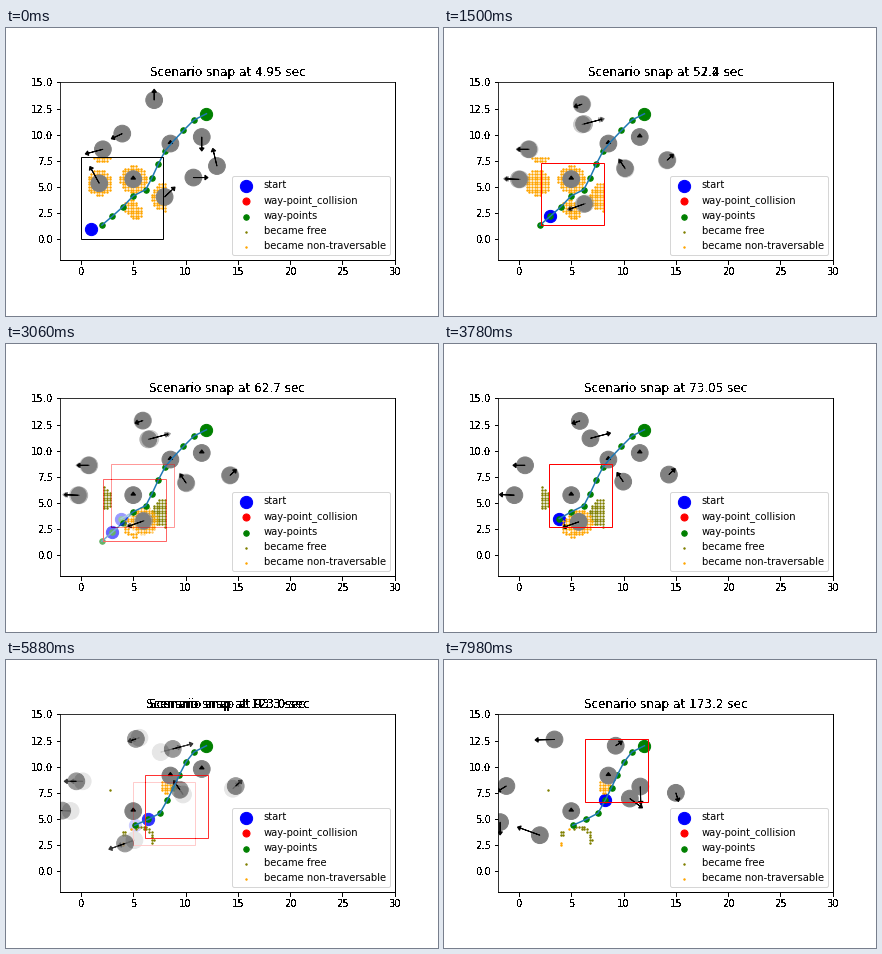
Write a matplotlib script that moves like this. It is 432 by 288 pixels and loops after 8 s.

```python
import numpy as np
import matplotlib.pyplot as plt
from matplotlib.animation import FuncAnimation
from matplotlib.patches import Circle, Rectangle

plt.rcParams.update({"font.family": "DejaVu Sans", "font.size": 10})

TICK, LOOP = 20, 8000
HOLD, FADE, STEPS = 300, 60, 5
PERIOD = HOLD + FADE * (STEPS - 1)
CELL = 0.25
ARROW_SECONDS = 42

TIMES = [4.95, 31.4, 52.2, 57.4, 62.65, 62.7, 67.85, 73.05,
         78.25, 83.2, 93.3, 123.0, 146.85, 170.15, 173.2, 173.2]
REPLAN, REROUTE = 5, 9  # snaps at which the known cells change

FIRST_ROUTE = [2 + 1.35j, 3 + 2.2j, 4 + 3.1j, 5 + 4.15j, 6.2 + 4.75j, 6.8 + 5.9j,
               7.4 + 7.2j, 8.05 + 8.45j, 8.8 + 9.35j, 9.8 + 10.4j, 10.8 + 11.4j, 12 + 12j]
NEW_ROUTE = [5.15 + 4.4j, 6.4 + 4.95j, 7.55 + 5.55j, 8.25 + 6.8j, 8.85 + 8j,
             9.4 + 9.2j, 10.05 + 10.45j, 10.8 + 11.4j, 12 + 12j]

# First snap, robot position, view direction in degrees, view reach
STAGES = [
    (0, 1 + 1j, 45, 4),
    (1, FIRST_ROUTE[0], 0, 3),
    (2, FIRST_ROUTE[1], 45, 3),
    (6, 3.85 + 3.5j, 47, 3),
    (9, NEW_ROUTE[0], 22, 3),
    (11, NEW_ROUTE[1], 24, 3),
    (12, NEW_ROUTE[2], 22, 3),
    (13, NEW_ROUTE[3], 69, 3),
]

# Each agent: initial arrow, then its turning points; steady speed in between
TURNS = [4.95, 31, 123.5, 173.2]
AGENTS = [
    (.75j, [7 + 13.3j, 6.3 + 13j, 5.25 + 12.65j, 3.4 + 12.6j]),
    (-.78 - .37j, [3.95 + 10.1j, 5.2 + 10.75j, 8.8 + 11.7j, 9.25 + 12j]),
    (-1.4 - .37j, [2.1 + 8.6j, 1.45 + 8.6j, -.45 + 8.6j, -1.2 + 8.15j]),
    (0, [8.55 + 9.15j] * 4),
    (-1.05j, [11.55 + 9.78j] * 3 + [11.6 + 8.1j]),
    (1.1, [10.75 + 5.9j, 10.4 + 6.4j, 9.45 + 7.8j, 10.6 + 6.95j]),
    (-.33 + 1.4j, [13 + 7j, 13.95 + 7.35j, 14.8 + 8.15j, 15 + 7.5j]),
    (.78 + .74j, [8 + 4.05j, 7 + 3.65j, 4.2 + 2.65j, 2 + 3.45j]),
    (-.75 + 1.35j, [1.75 + 5.35j, .7 + 5.7j, -1.8 + 5.8j, -1.8 + 4.7j]),
    (0, [5 + 5.75j] * 4),
]
CROSSING = AGENTS[7][1]

axis = np.arange(0, 16, CELL)
grid = axis + 1j * axis[:, None]


def disk(x, y, r):
    return abs(grid - (x + 1j * y)) <= r


def ring(x, y, inner, outer):
    return disk(x, y, outer) & ~disk(x, y, inner)


def xy(points):
    points = np.atleast_1d(np.asarray(points, complex))
    return points.real, points.imag


def place_at(turns, t):
    return np.interp(t, TURNS, turns)


def cells(n, t):
    """Return the freed and the blocked cells of a snap."""
    left = disk(1.75, 5.4, 1.25)
    right = disk(8, 4.05, 1.3) & (grid.real <= 8)
    if n < REPLAN:
        free = np.zeros(grid.shape, bool)
        blocked = (left | right | disk(5, 5.75, 1.3) | disk(4.8, 3.1, .7)
                   | disk(5.2, 2.6, .7) | (disk(2, 8.6, 1.25) & (grid.imag <= 7.8)))
    elif n < REROUTE:
        free = (left & (grid.real > 2)) | right
        crossing = place_at(CROSSING, t)
        blocked = (disk(crossing.real, crossing.imag, 1.3)
                   | (ring(5.2, 2.8, .75, 1.12) & (grid.real < 5.3) & (grid.imag < 3.6)))
    else:
        arc = ring(5.6, 3, 1.05, 1.42) & (grid.real > 5.2) & (grid.imag > 2.6)
        free = arc | disk(4.1, 3.6, .22) | disk(2.75, 7.75, .1)
        blocked = disk(8.2, 8.1, .65) | disk(4.75, 4, .1) | disk(4, 2.7, .21)
    return grid[free], grid[blocked]


def route_of(n, robot):
    if n < 6:
        return FIRST_ROUTE
    return [robot] + FIRST_ROUTE[3:] if n < REROUTE else NEW_ROUTE


def draw_agent(ax, first_arrow, turns, t):
    place = place_at(turns, t)
    leg = np.searchsorted(TURNS[1:-1], t)
    speed = (turns[leg + 1] - turns[leg]) / (TURNS[leg + 1] - TURNS[leg])
    arrow = complex(speed * ARROW_SECONDS if leg else first_arrow)
    ax.add_patch(Circle((place.real, place.imag), .8, color="gray", zorder=1.3))
    ax.arrow(place.real, place.imag, arrow.real, arrow.imag,
             head_width=.45, head_length=.3, color="black", zorder=1.4)


def draw_view(ax, robot, angle, reach, color):
    center = robot + reach * np.exp(1j * np.radians(angle))
    x0, y0 = max(center.real - reach, 0), max(center.imag - reach, 0)
    ax.add_patch(Rectangle((x0, y0), center.real + reach - x0, center.imag + reach - y0,
                           fill=False, ec=color, lw=1, zorder=2.1))


def render(n):
    """Draw one snap and return it as an RGB array."""
    t = TIMES[n]
    _, robot, angle, reach = [s for s in STAGES if s[0] <= n][-1]
    route = route_of(n, robot)
    free, blocked = cells(n, t)

    fig.clear()
    ax = fig.add_subplot()
    fig.subplots_adjust(left=.125, right=.9, bottom=.125, top=.88)
    ax.set(xlim=(-2, 30), ylim=(-2, 15), aspect="equal",
           title=f"Scenario snap at {t} sec")

    def dots(points, color, size, z, label=None):
        ax.scatter(*xy(points), s=size, c=color, zorder=z, label=label)

    dots(robot, "blue", 150, 1, "start")
    dots([], "red", 50, 1, "way-point_collision")
    dots(route, "green", 30, 1.2, "way-points")
    dots(route[-1], "green", 150, 1.2)
    dots(free, "olive", 2, 1.1, "became free")
    dots(blocked, "orange", 2, 1.1, "became non-traversable")
    for first_arrow, turns in AGENTS:
        draw_agent(ax, first_arrow, turns, t)
    ax.plot(*xy(route), color="C0", lw=1.5, zorder=2)
    draw_view(ax, robot, angle, reach, "red" if n else "black")
    ax.legend(loc="lower right")

    fig.canvas.draw()
    image = np.asarray(fig.canvas.buffer_rgba())[..., :3].astype(float)
    # Text around the plot has hard edges
    hard = np.where(image < 160, 0.0, 255.0)
    hard[INSIDE] = image[INSIDE]
    return hard


def compose(frame):
    n, rest = divmod(frame * TICK, PERIOD)
    step = 0 if rest < HOLD else (rest - HOLD) // FADE + 1
    old, new = snaps[n], snaps[n + 1]
    mix = old.copy() if step < 3 else np.minimum(old, new)
    w = step / STEPS
    mix[INSIDE] = (1 - w) * old[INSIDE] + w * new[INSIDE]
    return np.rint(mix).astype(np.uint8)


def update(frame):
    picture.set_data(compose(frame))
    return [picture]


INSIDE = (slice(54, 232), slice(54, 389))
fig = plt.figure(figsize=(6, 4), dpi=72, facecolor="white")
snaps = [render(n) for n in range(len(TIMES))]

fig.clear()
stage = fig.add_axes([0, 0, 1, 1])
stage.axis("off")
picture = stage.imshow(compose(0), aspect="auto", interpolation="nearest")

anim = FuncAnimation(fig, update, frames=LOOP // TICK, interval=TICK,
                     repeat=True, repeat_delay=0, blit=False)
plt.show()
```
